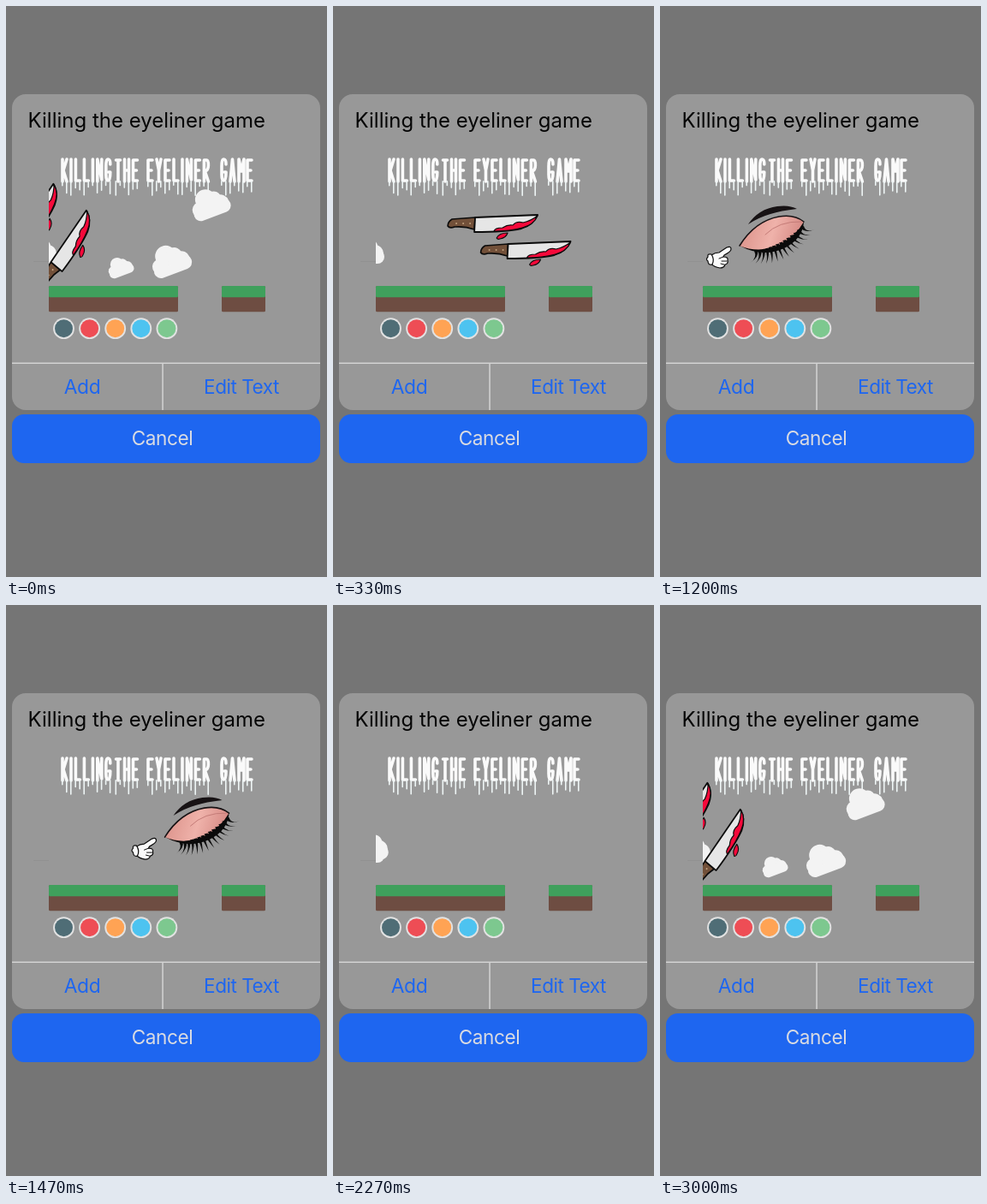
Recreate the animation shown at these times as an HTML page with a canvas. Size 375x667 px, loop 3.07 s.

```html
<!DOCTYPE html>
<html lang="en">
<head>
<meta charset="utf-8">
<title>Killing the eyeliner game</title>
<style>
html, body { margin: 0; width: 100%; height: 100%; overflow: hidden; background: #757575; }
canvas { display: block; }
</style>
</head>
<body>
<canvas id="stage" width="375" height="667"></canvas>
<script>
const ctx = document.getElementById('stage').getContext('2d');
const LOOP = 3070, BEAT = 400 / 3;
const BLUE = '#1e66f0', INK = '#0b0b0b', CLOUD = '#f3f3f3', BLOOD = '#f5093a';

const mix = (a, b, k) => a + (b - a) * k;
const ease = k => {
  k = Math.min(1, Math.max(0, k));
  return k * k * (3 - 2 * k);
};

function at(x, y, angle, draw, scale = 1) {
  ctx.save();
  ctx.translate(x, y);
  ctx.rotate(angle);
  ctx.scale(scale, scale);
  draw();
  ctx.restore();
}

function shape(d, fill, stroke, width = 1.5) {
  const path = new Path2D(d);
  if (fill) { ctx.fillStyle = fill; ctx.fill(path); }
  if (stroke) { ctx.strokeStyle = stroke; ctx.lineWidth = width; ctx.stroke(path); }
}

function box(x, y, w, h, fill, r = 0) {
  ctx.fillStyle = fill;
  ctx.beginPath();
  ctx.roundRect(x, y, w, h, r);
  ctx.fill();
}

function disc(x, y, r, fill) {
  ctx.fillStyle = fill;
  ctx.beginPath();
  ctx.arc(x, y, r, 0, Math.PI * 2);
  ctx.fill();
}

function label(text, x, y, size, fill, align, spacing = 0) {
  ctx.font = `${size}px Inter, sans-serif`;
  ctx.letterSpacing = `${spacing}px`;
  ctx.textAlign = align;
  ctx.fillStyle = fill;
  ctx.fillText(text, x, y);
}

// Stroke letters on a 5 x 26 grid for the dripping title.
const GLYPHS = {
  K: 'M0 0V26M5 0L1 13L5 26', I: 'M0 0V26', L: 'M0 0V25H5', N: 'M0 26V0L5 24V0',
  G: 'M5 6Q5 0 2.5 0Q0 0 0 8V18Q0 25 2.5 25Q5 25 5 15H3', T: 'M0 1H5M2.5 1V26',
  H: 'M0 0V26M5 0V26M0 13H5', E: 'M5 1H0V25H5M0 13H4', Y: 'M0 0L2.5 13L5 0M2.5 13V26',
  R: 'M0 26V1H3Q5 1 5 7Q5 13 1 14L5 26', A: 'M0 26L2.5 0L5 26M1 17H4',
  M: 'M0 26V0L3 14L6 0V26'
};

function drawWord(word, x) {
  for (const letter of word) {
    const narrow = letter === 'I';
    at(x, 179, 0, () => shape(GLYPHS[letter], null, '#fafafa', 3.6));
    for (let i = 0; i < (narrow ? 1 : 2); i++) {
      const length = 12 + 6 * Math.sin(x * 7.3 + i * 2.6);
      box(x - 1 + i * 5, 204, 1.6, length, '#eef5f5', 1);
    }
    x += narrow ? 5.4 : 10;
  }
}

function drawTitle() {
  ctx.lineCap = ctx.lineJoin = 'round';
  drawWord('KILLING', 66);
  drawWord('THE', 128.5);
  drawWord('EYELINER', 166);
  drawWord('GAME', 252);
}

function drawCloud() {
  box(-22, 1, 45, 16, CLOUD, 8);
  disc(-3, -5, 12, CLOUD);
  disc(-13, 4, 9, CLOUD);
  disc(6, -2, 9.5, CLOUD);
  disc(12, 5, 10, CLOUD);
}

// Three clouds fixed to one frame that turns as it travels.
function drawClouds(d) {
  const x = Math.max(42, 237 - 3.5 * d + (d < 0 ? 2.4 : 4) * d ** 3);
  const y = Math.max(228, 246 - 37 * Math.sin(.45 * d));
  at(x, y, -.07 - .07 * d, () => {
    at(0, 0, -.22, drawCloud);
    at(-55, 59, -.22, drawCloud, 1.03);
    at(-114, 59, -.22, drawCloud, .66);
  });
}

// Knife with its tip at the origin.
function drawKnife() {
  ctx.lineJoin = 'round';
  shape('M-74 3L-101 5Q-106 8 -106 13Q-104 16 -98 14Q-86 13 -75 17Z', '#725039', INK, 1.7);
  shape('M-74 3L-1 0Q-6 12 -20 16Q-38 20 -75 20Z', '#e6e6e6', INK, 1.8);
  shape('M-1 1Q-6 12 -19 15Q-34 19 -52 19Q-51 15 -42 15Q-36 11 -30 12Q-26 7 -18 9Q-9 7 -1 1Z',
    BLOOD, INK, 1.2);
  shape('M-49 27Q-46 21 -36 21Q-38 27 -45 28Q-48 29 -49 27Z', BLOOD, INK, 1.1);
  for (let x = -96; x <= -80; x += 8) disc(x, 10, 1, '#c2a27f');
}

// Both knives lean in, then swing level and shoot off to the right.
function drawKnives(d) {
  const level = ease((d - 1) / 3);
  const x = 81 + 11 * d + 2.4 * d ** 3;
  const y = mix(239.5 - 1.5 * d, 275, level);
  const angle = mix(-.845 - .085 * d, 0, level);
  at(x - 38.5, y - 31, angle, drawKnife);
  at(x, y, angle, drawKnife);
}

function drawEye() {
  const skin = ctx.createLinearGradient(5, 25, 70, 45);
  skin.addColorStop(0, '#dd958d');
  skin.addColorStop(.5, '#efb2aa');
  skin.addColorStop(1, '#d58883');
  ctx.lineCap = 'round';
  const lid = 'M0 47C10 31 24 17 46 13Q64 10 75 19';
  shape(lid + 'Q70 36 50 47Q24 60 0 47Z', skin);
  shape(lid, null, '#171214', 1.6);
  shape('M30 34Q46 18 72 19', null, '#c47c78', 1);
  shape('M0 47Q24 57 48 45Q66 35 75 19Q74 38 54 49Q28 62 0 47Z', INK);
  shape('M10 22Q22 4 44 1Q58 -1 67 4Q48 6 36 10Q22 14 10 22Z', '#171214');
  for (let i = 0; i < 14; i++) {
    const k = i / 13;
    const x = 19 + 54 * k, y = 53 - 6 * k - 22 * k * k;
    const reach = 15 + 4 * Math.sin(k * Math.PI), turn = 2 - 1.8 * k;
    const tipX = x + reach * Math.cos(turn), tipY = y + reach * Math.sin(turn);
    shape(`M${x - 2} ${y}Q${x + 2} ${y + 8} ${tipX} ${tipY}Q${x + 4} ${y + 7} ${x + 2} ${y - 1}Z`, INK);
  }
}

// Gloved hand pointing up and to the right.
function drawHand() {
  ctx.lineJoin = 'round';
  shape('M6 10Q10 7 15 7L24 1Q29 -1 29 3Q29 6 21 10L20 12Q26 12 25 16Q26 20 22 21' +
    'Q21 25 16 25Q9 24 6 20Z', '#fafafa', INK, 1.2);
  shape('M6 9Q1 8 2 12Q-1 15 2 17Q2 22 7 21Q10 15 6 9Z', '#fafafa', INK, 1.2);
  shape('M20 12L15 14M24 17L18 17M21 21L17 20', null, INK, 1);
}

// Hand and eye settle slowly, then dash away.
function drawEyeScene(d) {
  const x = 98 + 4.5 * d + (d < 0 ? .5 : 2.8) * d ** 3;
  const lift = Math.max(0, d) ** 2;
  at(x, 233 - lift, 0, drawEye);
  at(x - 39, 281 - lift, 0, drawHand);
}

function drawPanel() {
  box(0, 0, 375, 667, '#757575');
  box(7, 103, 360, 369, '#989898', 16);
  label('Killing the eyeliner game', 25.5, 142, 24, '#050505', 'left');
  box(7, 416.6, 360, 1.5, '#d3d3d3');
  box(182.3, 418, 1.5, 54, '#d3d3d3');
  label('Add', 89, 453, 22.8, BLUE, 'center', -.4);
  label('Edit Text', 275, 453, 22.6, BLUE, 'center', -.5);
  box(7, 477, 360, 57, BLUE, 14);
  label('Cancel', 182.5, 513, 22.6, '#d9dbe2', 'center', -.4);
  box(32, 298, 18, 1, '#919191');
  drawTitle();
}

function drawGround(x, width) {
  box(x, 327, width, 30.3, '#6e4d42', 1.5);
  box(x, 327, width, 13.3, '#3fa05c', 1.5);
}

function drawPalette() {
  ['#4f6d76', '#ee4d55', '#ffa354', '#4dc3f0', '#7dc88f'].forEach((color, i) => {
    disc(67.5 + i * 30.1, 376.7, 12.4, '#e2e2e2');
    disc(67.5 + i * 30.1, 376.7, 10.5, color);
  });
}

// Time is held on even beats; the beat shifts by half between passages.
function hold(time) {
  const shifted = time >= 1530 && time < 2000 || time >= 2330;
  const phase = shifted ? 60 : 0;
  return Math.floor((time - phase) / BEAT) * BEAT + phase;
}

function render(ms) {
  const t = ms % LOOP;
  const time = t < 866 ? t + LOOP : t;
  const beat = hold(time);

  drawPanel();
  drawGround(50, 151);
  drawGround(252, 51);
  drawPalette();

  ctx.save();
  ctx.beginPath();
  ctx.rect(50, 160, 253, 198);
  ctx.clip();
  if (time < 1660) {
    drawEyeScene((beat - 1267) / 67);
  } else if (time >= 2000) {
    const d = (beat - 2860) / BEAT;
    at(37, 284, 0, drawCloud);
    if (beat >= 2260) drawClouds(d);
    drawKnives(d);
  }
  ctx.restore();
}

const start = performance.now();
function tick() {
  render(performance.now() - start);
  requestAnimationFrame(tick);
}
tick();
</script>
</body>
</html>
```
